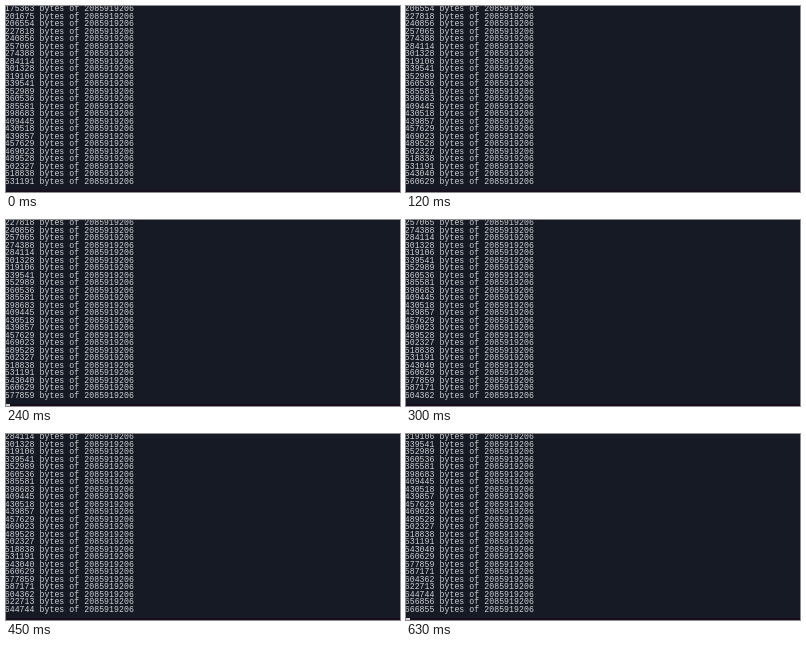
Animation, 394 px wide and 186 px high, one loop 660 ms. Source, as an HTML page with a canvas:

```html
<!DOCTYPE html>
<html lang="en">
<head>
<meta charset="utf-8">
<title>Download log</title>
<style>
  html, body { margin: 0; width: 100%; height: 100%; overflow: hidden; background: #151a24; }
  canvas { display: block; width: 394px; height: 186px; }
</style>
</head>
<body>
<canvas id="stage" width="394" height="186"></canvas>
<script>
const ctx = document.getElementById('stage').getContext('2d', { alpha: false });

const TICK = 30;
const TICKS = 22;
const ROWS = 24;
const ROW_HEIGHT = 7.5;
const CHAR_WIDTH = 4.97;
const LEFT = -1.3;
const FIRST_BASELINE = 5.2;
const TOTAL = 2085919206;

// Repeatable noise in the range 0 to 1.
function noise(n) {
  const x = Math.sin(n * 12.9898) * 43758.5453;
  return x - Math.floor(x);
}

// Bytes received by log line n: steady growth with uneven steps.
function received(n) {
  return Math.round(181363 + 15252 * n + 12000 * (noise(n) - 0.5));
}

// Lines arrive at an even pace with a short periodic burst.
function linesScrolled(tick) {
  return Math.floor(0.45 * tick + 0.3 + 0.3 * Math.cos(tick * Math.PI * 2 / 5));
}

function drawLine(text, y) {
  [...text].forEach((char, i) => ctx.fillText(char, LEFT + i * CHAR_WIDTH, y));
}

function draw(tick) {
  const offset = linesScrolled(tick);
  const cursorOn = offset === linesScrolled(tick - 1);

  ctx.fillStyle = '#151a24';
  ctx.fillRect(0, 0, 394, 186);
  ctx.fillStyle = '#170d1f';
  ctx.fillRect(0, 184, 394, 2);

  ctx.font = '8.2px "Liberation Mono", monospace';
  ctx.fillStyle = '#d0d2d4';
  for (let row = 0; row < ROWS; row++) {
    drawLine(`${received(offset + row)} bytes of ${TOTAL}`, FIRST_BASELINE + row * ROW_HEIGHT);
  }

  if (cursorOn) {
    ctx.fillStyle = '#d0d2d4';
    ctx.fillRect(0, 184, 4, 2);
  }
}

let start;
let shown = -1;
function frame(now) {
  start ??= now;
  const tick = Math.floor((now - start) / TICK) % TICKS;
  if (tick !== shown) draw(shown = tick);
  requestAnimationFrame(frame);
}
draw(0);
requestAnimationFrame(frame);
</script>
</body>
</html>
```
